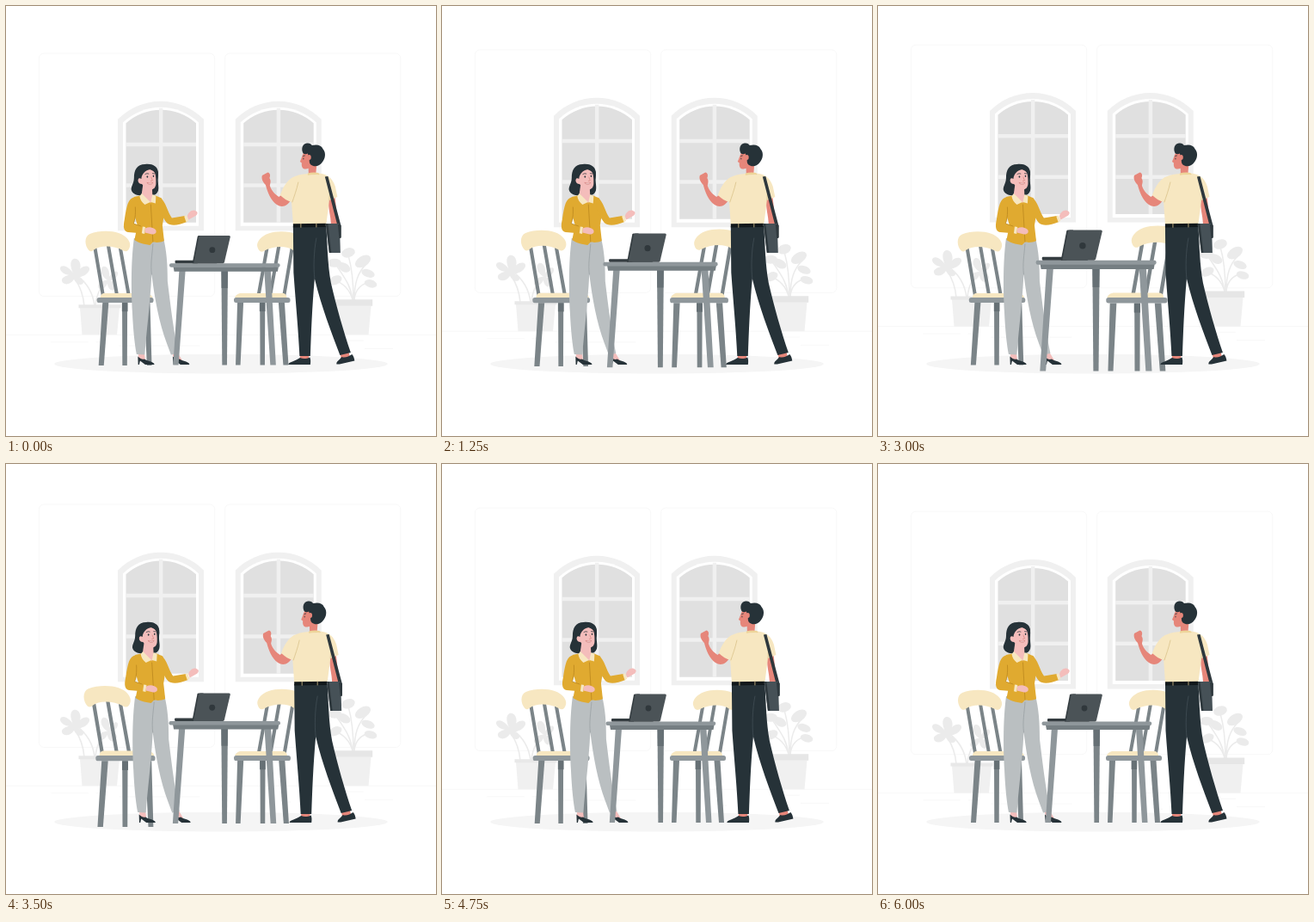
These frames come from a looping animation (500 by 500 pixels, 6040 ms). An HTML page:

```html
<!DOCTYPE html>
<html lang="en">
<head>
<meta charset="utf-8">
<title>Meeting at a table</title>
<style>
html, body { margin: 0; width: 100%; height: 100%; overflow: hidden; background: #fff; }
svg { display: block; width: 100vw; height: 100vh; }
.ink { fill: #263238; }
.gold { fill: #e0aa30; }
.cream { fill: #f7e7c1; }
.rose { fill: #f4bdbb; }
.tan { fill: #e6867a; }
.steel { fill: #8f979b; }
.iron { fill: #7b8488; }
.dim { fill: #667075; }
.line { fill: none; stroke-linecap: round; stroke-linejoin: round; }
</style>
</head>
<body>
<svg viewBox="0 0 500 500">
  <defs>
    <g id="window">
      <path fill="#f0f0f0" d="M130 132A70 70 0 0 1 230 132V261.5H130Z"/>
      <path fill="#fff" d="M136 135.5A64 64 0 0 1 224 135.5V256H136Z"/>
      <path fill="#e0e0e0" d="M139.5 136.5A61 61 0 0 1 221 136.5V252H139.5Z"/>
      <path fill="#f0f0f0" d="M178 119h4.400V252h-4.400ZM139.500 159H221v4.500H139.500ZM139.500 206.500H221v4.500H139.500Z"/>
    </g>
    <g id="chair">
      <path class="iron" d="M160 345h7l2 72h-5.500ZM135 345h6l-.3 72h-5.400Z"/>
      <path class="dim" d="M134.800 345h6.600v10h-6.600Z"/>
      <path class="line" stroke="#7b8488" stroke-width="4" stroke-linecap="butt" d="M104 283L113 336M119 279L129 336M133 283L142.500 336"/>
      <path class="cream" d="M97 285C92 280 91 269 98 266C108 262 122 262 131 265C140 268 145 275 144 280C143 285 140 287 137 285.500C125 279 110 279 103 284C101 286 99 286.500 97 285Z"/>
      <path class="cream" d="M110 339C110 336 112 334 115 334H162C166 334 169 336 170 339Z"/>
      <rect class="steel" x="106" y="339" width="65" height="6" rx="2.500"/>
      <path class="iron" d="M112.500 345h7L114 417h-6Z"/>
    </g>
  </defs>

  <g id="room">
    <g fill="none" stroke="#ebebeb" stroke-width=".35">
      <rect x="38.400" y="55.200" width="204.200" height="282.500" rx="5.600"/>
      <rect x="254.600" y="55.200" width="204.200" height="282.500" rx="5.600"/>
      <path d="M0 382.500H500M417 398.600h33M322.500 401.300h8.700M396.600 389.300h19.200M52.500 391h43.200M104.600 391h6.300M131.500 395.200h93.700"/>
    </g>
    <use href="#window"/>
    <use href="#window" x="136.700"/>
    <g fill="#ebebeb">
      <path class="line" stroke="#ebebeb" stroke-width="1.600" d="M103 349C101 332 93 321 82 313M91 349C90 336 86 326 80 317M104 349C105 335 110 325 121 318"/>
      <path d="M80 314C75 307 73 296 79 294C85 293 88 301 86 306C91 301 98 302 97 307C95 313 88 315 84 316C90 318 92 322 88 324C83 325 80 320 79 318C75 325 66 325 65 320C64 316 70 314 73 313C65 312 61 306 64 303C69 300 77 307 80 314Z"/>
      <path d="M118 319C111 315 108 306 113 303C119 302 121 311 120 315C125 307 131 307 130 312C129 317 124 319 121 320C128 320 131 325 127 329C122 334 118 327 118 323C114 331 107 331 107 326C108 321 113 319 118 319Z"/>
      <path fill="#f0f0f0" d="M86 351H132L129 382.500H88.500Z"/>
      <path fill="#e8e8e8" d="M84.500 347.500h49v4h-49Z"/>
    </g>
    <g fill="#ebebeb">
      <path class="line" stroke="#ebebeb" stroke-width="1.500" d="M404 342C404 320 402 304 398 290M405 342C405 322 409 310 419 300M405 342C406 330 413 323 424 321M403 342C401 324 392 314 383 300M403 342C400 330 392 322 380 318"/>
      <ellipse cx="398" cy="287" rx="8" ry="5.500" transform="rotate(-18 398 287)"/>
      <ellipse cx="415" cy="297" rx="10" ry="6" transform="rotate(-32 415 297)"/>
      <ellipse cx="421" cy="311" rx="8" ry="4.500" transform="rotate(20 421 311)"/>
      <ellipse cx="424" cy="323" rx="7.500" ry="4.500" transform="rotate(15 424 323)"/>
      <ellipse cx="393" cy="304" rx="8" ry="5" transform="rotate(30 393 304)"/>
      <ellipse cx="382" cy="299" rx="8" ry="5"/>
      <ellipse cx="383" cy="319" rx="8" ry="5" transform="rotate(-25 383 319)"/>
      <path fill="#f0f0f0" d="M379 349H424.500L421.500 382.500H383Z"/>
      <path fill="#e6e6e6" d="M375 341.500h51.200v7.500H375Z"/>
    </g>
  </g>

  <ellipse cx="250" cy="416.200" rx="193.900" ry="11.300" fill="#f5f5f5"/>
  <g id="seat"><use href="#chair"/></g>

  <g class="person">
    <path class="rose" d="M154 403h7l1 9-8-1ZM193 402h6l6 10-9 1Z"/>
    <path class="ink" d="M153.500 407.500C157 411 159 411 161 410.500C164 413 170 413 172.500 416V417H162L156 412.500L155 417H153.800ZM194 407.500C197 411 200 411.500 202 410.500C205 413 211 413 213.300 416V417H203L197 412.500L196 417H194.800Z"/>
    <path fill="#babfc1" d="M149 270C145 300 146 335 147 355C148 378 150 395 152 405L161.500 405.500C163 382 167.500 350 169.500 312C173 340 178 368 187 392L192 405.500L200.500 404C195 378 191 345 188 320C188 300 187 285 183 269Z"/>
    <path class="line" stroke="#959c9f" stroke-width=".7" d="M171 277C170 290 168 300 169.500 312"/>
    <path class="ink" d="M162 184C152 184 149 191 149 200C149 207 144 211 146.500 215.500C150 221 160 222 164 218C168 221.500 175 221 177 215C178.500 210 176 205 177 196C178 188 172 183 162 184Z"/>
    <path class="gold" d="M149 222L160 219.500L168 227L173 220L181 223.500C185 235 184 245 182 255L184 273C180 275.500 173 275 171 274.500L167.500 278C160 277 153 275 149.500 272L153 255C150 245 147 235 149 222Z"/>
    <path class="rose" d="M159.500 207L170 211L170.500 222L168.500 229L157.500 221Z"/>
    <path class="rose" d="M156 194C159 188 169 188 173.500 194C174.500 199 174.700 202 174.500 207C174 213 169 215 164 212.500L158 207C153 207 152 200 156.500 199Z"/>
    <path class="ink" d="M157.500 201C158 195 162 191 168 190C173 191 175 196 176 203C179 194 176 185 167 184.500C157 183 149 191 150 204L154 207C152 202 154 199 157.500 201Z"/>
    <path class="ink" d="M163.600 198.600a.9 1.100 0 1 0 1.800 0a.9 1.100 0 1 0-1.800 0ZM170.800 197.800a.8 1.100 0 1 0 1.600 0a.8 1.100 0 1 0-1.600 0Z"/>
    <path class="line" stroke="#263238" stroke-width=".7" d="M162 195.500Q164 194 166 195M170.500 194.700L173 195"/>
    <path class="line" stroke="#d5847e" stroke-width=".7" d="M169 199L170.500 203L168.500 203.500"/>
    <path fill="#fff" stroke="#c96c68" stroke-width=".6" d="M164 205.500Q168 209.500 171 205.500Q168 207 164 205.500Z"/>
    <path class="cream" d="M158 218L168 228L161.500 231C158 228 156 225 155.500 221ZM170.500 219L174.500 221L174 229.500L168.500 228Z"/>
    <path class="gold" d="M150 222C142 223.500 140.500 232 138 248C136 257 137 262 142 263L160 264.500L161 257L148.500 253C151 246 153.500 238 154 230Z"/>
    <path class="line" stroke="#b6831c" stroke-width=".7" d="M150.500 234C151 243 150 248 148.500 253L157 256M179.500 233C181 240 184 246 187 251M168.500 231L171 274"/>
    <path class="cream" d="M159 256.500L162.200 257L161.200 265L158 264.200Z"/>
    <path class="rose" d="M162 258.500C166 256.500 170 256.500 174 260C176 263 174 265.500 170 265.500L161.500 263.500Z"/>
    <path class="gold" d="M179 222.500C186 227 188 240 193 246.500L208 244L210.500 251C200 255.500 191 256 187 252C182 245 178 238 177 232Z"/>
    <path class="cream" d="M207.300 244.500L210 243.300L212.300 249.700L209.600 251.200Z"/>
    <path class="rose" d="M211 244.500C212 239 218 236 221 238.500C224 240 222.500 242.500 220.500 244L212.500 248.500Z"/>
  </g>

  <g id="table">
    <use href="#chair" transform="matrix(-1 0 0 1 436 0)"/>
    <path class="iron" d="M250.500 308h7.500l-1 109h-5.600Z"/>
    <path class="dim" d="M250.500 308h7.500l-.3 20h-7Z"/>
    <path class="steel" d="M201.800 308h7.200L201 417h-6.200ZM300 308h7.500L313.500 417H307Z"/>
    <path fill="#757e82" d="M195 303.500H316.500L315.500 309H196Z"/>
    <rect class="steel" x="190.500" y="299.500" width="127.700" height="4.600" rx="2"/>
    <rect x="197" y="296" width="49" height="3.500" rx="1" fill="#343c40"/>
    <path fill="#343c40" d="M223 268.500Q223.400 267.500 224.500 267.500H230L223 299.500H217Z"/>
    <path fill="#4b5357" d="M224.500 269Q225 267.500 226.500 267.500H259.500Q261 267.500 260.800 269L254 298Q253.600 299.500 252 299.500H218.500Z"/>
    <circle cx="240" cy="284" r="3.400" fill="#30383c"/>
  </g>

  <g class="person">
    <path class="tan" d="M342 402h11l-1 9h-10ZM388 400h10l2 8-10 3Z"/>
    <path class="ink" d="M342 409C346 411 350 410 353.500 408.500C354.500 411 354.500 414 354 417H328.500C328 414 337 413 342 409ZM390.500 408C394 409.500 399 407.500 402.500 405C404.500 407 405 410 405.500 412.500L388 416.500H384.500C384 413 388 412 390.500 408Z"/>
    <path class="ink" d="M334 256H372.500C374 280 374 300 378 322C384 348 393 380 401 403L388.500 406C378 378 367 350 359 317C356 350 355 380 354 407H341.500C340 375 337 345 334.500 310Z"/>
    <path class="line" stroke="#455259" stroke-width=".7" d="M359 317C357.500 305 358 285 361 270"/>
    <path class="tan" d="M375.500 222L382.500 221C384 232 385 244 385.500 254L378 255C378 243 374 235 375.500 222Z"/>
    <path class="tan" d="M323 217L332 224C328 233 321 235 315 231C308 226 304 216 302 208C298 204 297 200 298 197L304.500 193.500C307 194 308 197 306.500 200C309 204 307 207 307 209C309 215 313 219 317.500 222Z"/>
    <path class="tan" d="M351.500 181L361.500 183L360.500 195L352 196Z"/>
    <path class="cream" d="M334 199C342 195 354 194.500 364 194.500C373 195 380 200 383 210L385.500 222L376 226L372.500 254H334L332 226L319 220C323 210 327 203 334 199Z"/>
    <path class="cream" d="M334 199C327 203 322 211 319 220C323 224 328 227 333 228L339 213Z"/>
    <path class="line" stroke="#d6bd83" stroke-width=".7" d="M340 205C338 214 335 222 333 228M376 226L377 212M352 195.700L364 195.500"/>
    <path fill="#eed59a" d="M351 194.500Q357 193 363.500 194L364 196.200Q357 195.300 351 196.800Z"/>
    <path class="tan" d="M346 171C344.500 174 343 179 342 181L344 182.500C343.500 187 345 190 349 189.500C355 189 360 184 361 179L359 169Z"/>
    <path class="ink" d="M345.500 171C343 166 345 160 350 159.500C353 159 355 160.500 356 162C362 160.500 367 162 368.500 166C373 171 371 178 368 181.500C365 186 359 188 354.500 184.500C352 182 353.500 179 352.500 177L351 171.500C349 172.500 347 172.500 345.500 171Z"/>
    <path class="tan" d="M350.500 176a2.200 3 0 1 0 4.400 0a2.200 3 0 1 0-4.400 0Z"/>
    <path class="line" stroke="#263238" stroke-width=".8" d="M345.700 174.500L347.500 174M346 177v1"/>
    <path fill="#11181b" d="M334 253.300L372 252.700V257L334 257.600Z"/>
    <path class="line" stroke="#d8c28c" stroke-width=".8" stroke-linecap="butt" d="M343 253.300v4M361 253v4"/>
    <path fill="#2e383d" d="M371 198.500L374.500 198L389.500 255V270H387.500L386 257Z"/>
    <path fill="#465157" d="M372 253H388L389 287H376Z"/>
    <path fill="#2e383d" d="M372 253H374.500L378.500 287H376ZM386 253.500L389.800 255V269L387.500 270Z"/>
  </g>
</svg>
<script>
const LOOP = 6040, LEAD = 40;
const $ = id => document.getElementById(id);
const people = document.querySelectorAll('.person');

// Key lists hold [share of the period, value] pairs, joined by straight lines.
const FLOAT = [[0, 0], [.5, -10], [1, 0]];
const BEAT = [[0, 1], [.1, 1.1], [.3, 1], [.4, 1], [.5, 1.1], [.6, 1], [1, 1]];
const SHAKE = [0, -1, 2, -4, 4, -4, 4, -4, 2, -1, 0].map((x, i) => [i / 10, x]);

function at(keys, time, period) {
  const p = time % period / period;
  const i = keys.findIndex(([k]) => k > p);
  const [a, from] = keys[i - 1], [b, to] = keys[i];
  return from + (to - from) * (p - a) / (b - a);
}

const scale = (x, y, s) => `translate(${x} ${y}) scale(${s}) translate(${-x} ${-y})`;
const move = (node, value) => node.setAttribute('transform', value);

function draw() {
  const t = performance.now() % LOOP + LEAD;
  move($('room'), `translate(0 ${at(FLOAT, t, LOOP)})`);
  move($('seat'), scale(132, 340, at(BEAT, t, LOOP / 2)));
  move($('table'), scale(262, 339, at(BEAT, t, LOOP)));
  const sway = `translate(${at(SHAKE, t, LOOP / 2)} 0)`;
  people.forEach(p => move(p, sway));
  requestAnimationFrame(draw);
}
draw();
</script>
</body>
</html>
```
